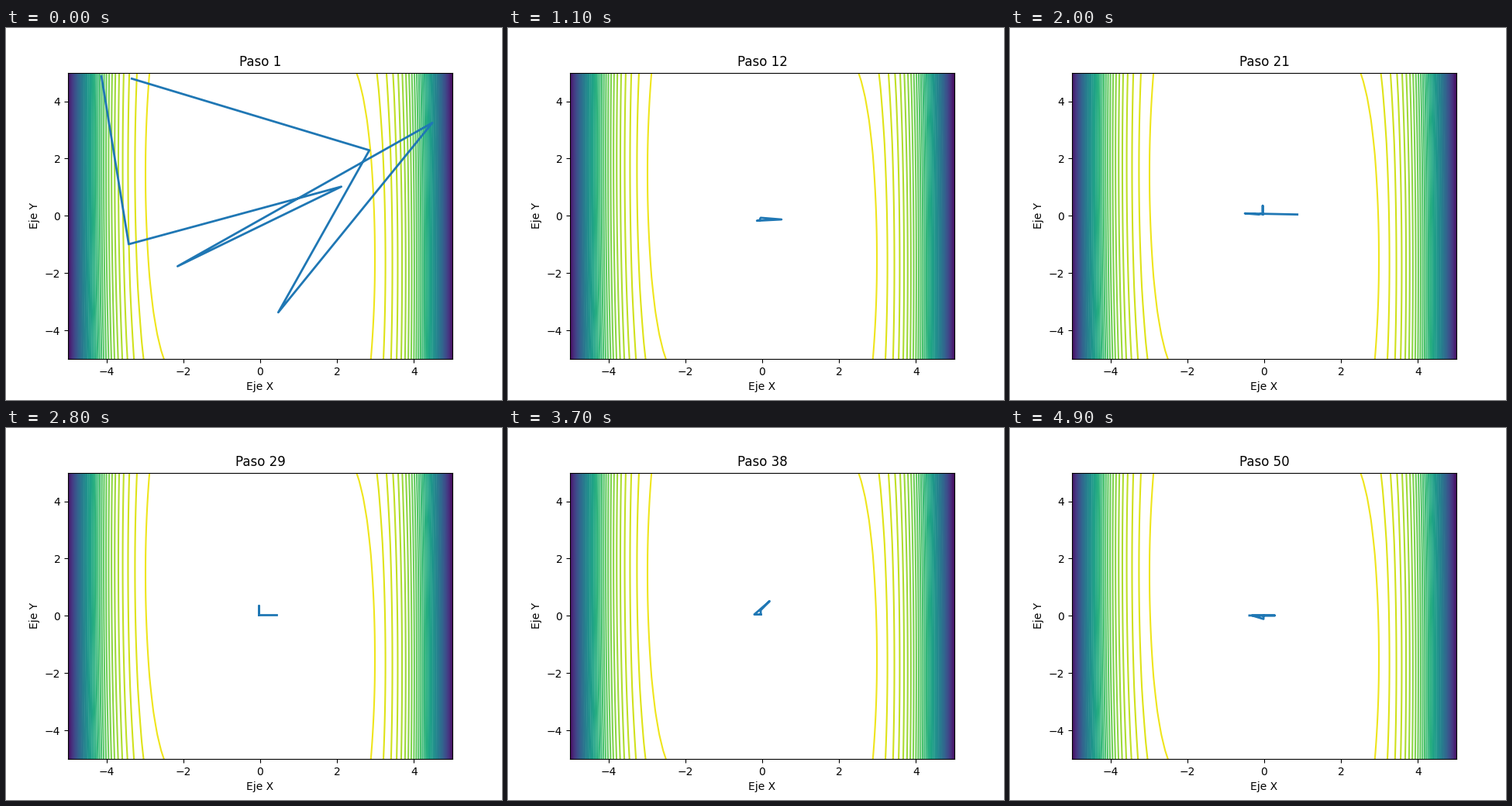
Recreate the animation shown at these times as a matplotlib script. Size 640 by 480 pixels, loop 5000 ms.

```python
import matplotlib.pyplot as plt
import numpy as np
from matplotlib.animation import FuncAnimation

STEPS = 50
PARENTS = 3
MUTATION_RATE = 0.3
MUTATION_SIZE = 0.45
START = np.array([(-4.13, 4.87), (-3.42, -0.99), (2.11, 1.02), (-2.15, -1.76),
                  (4.48, 3.25), (0.47, -3.37), (2.84, 2.29), (-3.34, 4.79)])


def fitness(x, y):
    """Negated three-hump camel function, highest at the origin."""
    return -(2 * x**2 - 1.05 * x**4 + x**6 / 6 + x * y + y**2)


def next_generation(population, rng):
    """Cross the fittest individuals, mutate some genes and keep the best one."""
    ranking = np.argsort(-fitness(*population.T))
    best = population[ranking[0]]
    parents = population[ranking[:PARENTS]]
    picks = rng.integers(PARENTS, size=population.shape)
    children = np.take_along_axis(parents, picks, axis=0)
    mutated = rng.random(children.shape) < MUTATION_RATE
    children += mutated * rng.normal(0, MUTATION_SIZE, children.shape)
    children[-1] = best
    return children


def evolve(steps, seed=3):
    rng = np.random.default_rng(seed)
    history = [START]
    while len(history) < steps:
        history.append(next_generation(history[-1], rng))
    return history


generations = evolve(STEPS)

fig, ax = plt.subplots(figsize=(6.4, 4.8), dpi=100)
axis = np.linspace(-5, 5, 100)
X, Y = np.meshgrid(axis, axis)
ax.contour(X, Y, fitness(X, Y), levels=50, cmap="viridis")
path, = ax.plot([], [], color="C0", linewidth=2)
ax.set(xlim=(-5, 5), ylim=(-5, 5), xlabel="Eje X", ylabel="Eje Y")
title = ax.set_title("Paso 1")


def update(frame):
    path.set_data(*generations[frame].T)
    title.set_text(f"Paso {frame + 1}")
    return path, title


anim = FuncAnimation(fig, update, frames=STEPS, interval=100, repeat=True, repeat_delay=0)
plt.show()
```
